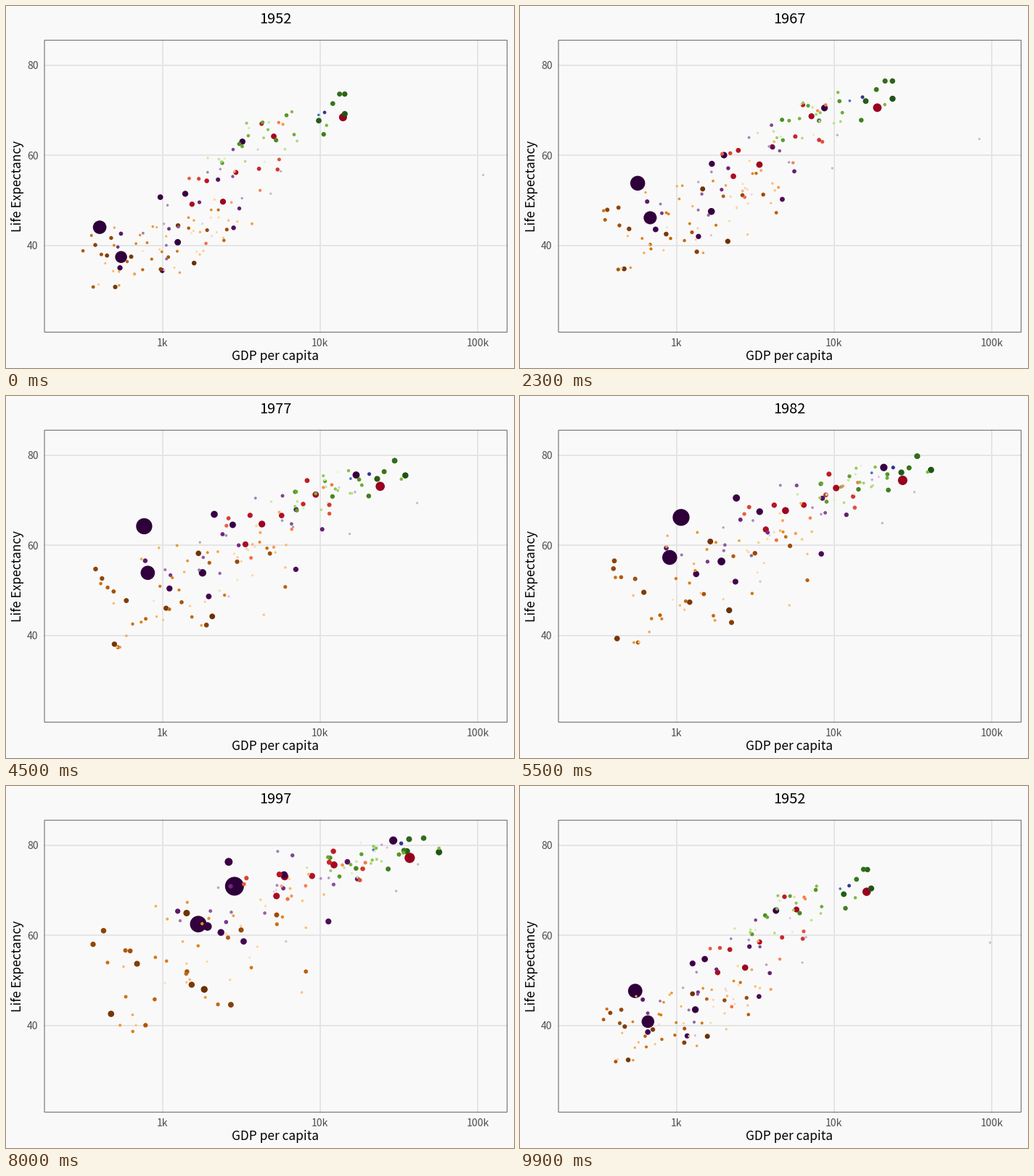
Animation of 700x500 px, one loop 10 s. Source, as a matplotlib script:

```python
import numpy as np
import matplotlib.pyplot as plt
from matplotlib.animation import FuncAnimation
from matplotlib.colors import LinearSegmentedColormap
from matplotlib.patches import Rectangle

W, H, DPI = 700, 500, 100
PX = 72 / DPI                            # one pixel in points
YEARS = np.arange(1952, 2008, 5)
N = len(YEARS)
T = np.linspace(0, 1, N)                 # progress through the years
STEPS = [8] + [9] * 4 + [8] * 7          # frames per transition
STARTS = np.cumsum([0] + STEPS)

# Per continent: palette, countries, population range in millions and its
# growth, start and end of (log income, spread, life span, spread), pull of
# size on income, link of income to life span, and easing power.
CONTINENTS = {
    "asia": dict(
        palette="#2E0039 #40004B #762A83 #9970AB #C2A5CF #E7D4E8",
        count=29, pops=(130, .5), growth=2.4,
        start=(3.2, .29, 47, 7.5), end=(3.78, .44, 71, 5.5),
        pull=-.45, link=.7, power=1.35),
    "africa": dict(
        palette="#6A3006 #B35806 #E08214 #FDB863 #FEE0B6",
        count=51, pops=(60, .4), growth=3.5,
        start=(2.96, .26, 39.3, 4.5), end=(3.2, .38, 54.5, 7.5),
        pull=0, link=.5, power=1.9),
    "europe": dict(
        palette="#1F5514 #4D9221 #7FBC41 #B8E186 #E6F5D0",
        count=30, pops=(78, .8), growth=1.35,
        start=(3.72, .23, 65, 4.5), end=(4.37, .22, 77.7, 2.3),
        pull=.4, link=.75, power=1.5),
    "americas": dict(
        palette="#98001F #C01A26 #F46D43 #FDAE61 #FEE090",
        count=24, pops=(100, 1.2), growth=2.1,
        start=(3.46, .19, 53, 7.5), end=(3.92, .21, 73.3, 3.2),
        pull=.2, link=.6, power=1.4),
    "oceania": dict(
        palette="#313695 #4575B4",
        count=2, pops=(14, 3), growth=2,
        start=(4.01, .01, 69.2, .2), end=(4.47, .05, 80.7, .4),
        pull=.9, link=.9, power=1.2),
}

# Outstanding paths: population, then (year, income, life span) points
PATHS = {
    "asia": [
        (845, [(1952, 400, 44), (1962, 488, 44.5), (1967, 613, 58.4),
               (1977, 741, 64), (1992, 1656, 68.7), (2007, 4959, 73)]),
        (634, [(1952, 547, 37.4), (1967, 701, 47.2), (1982, 856, 56.6),
               (1992, 1164, 60.2), (2007, 2452, 64.7)]),
        (114, [(1952, 3217, 63), (1967, 9848, 71.4), (1977, 16610, 75.4),
               (1992, 26825, 79.4), (2007, 31656, 82.6)]),
        (1.1, [(1952, 108382, 55.6), (1967, 80895, 64.6),
               (1982, 31354, 71.3), (2007, 47307, 77.6)]),
    ],
    "africa": [
        (5, [(1952, 493, 40), (1987, 848, 44), (1992, 737, 23.6),
             (1997, 590, 36.1), (2007, 863, 46.2)]),
    ],
    "americas": [
        (220, [(1952, 13990, 68.4), (1967, 19530, 70.8),
               (1992, 32004, 76.1), (2007, 42952, 78.2)]),
    ],
}


def mix(a, b, t):
    return a + (b - a) * t


def follow(points):
    years, income, life = zip(*points)
    return np.interp(YEARS, years, np.log10(income)), np.interp(YEARS, years, life)


def scores(count, rng):
    return rng.permutation(np.linspace(-1.7, 1.7, count))


def blend(a, b, share):
    """Mix two independent scores, keeping their spread."""
    return share * a + np.sqrt(1 - share ** 2) * b


def simulate(spec, rng):
    count = spec["count"]
    size = np.linspace(1.7, -1.7, count)
    wealth = blend(size, scores(count, rng), spec["pull"])
    health = blend(wealth, scores(count, rng), spec["link"])
    drift_w, drift_h = scores(count, rng), scores(count, rng)
    ease = 1 - (1 - T) ** spec["power"]
    income, gap, life, span = (mix(a, b, ease)
                               for a, b in zip(spec["start"], spec["end"]))
    turn = .55 * T                       # ranks change slowly over the years
    for i, pop in enumerate(np.geomspace(*spec["pops"], count)):
        w = wealth[i] * np.cos(turn) + drift_w[i] * np.sin(turn)
        h = health[i] * np.cos(turn) + drift_h[i] * np.sin(turn)
        w, h = (np.clip(z + rng.normal(0, .07, N), -1.9, 1.9) for z in (w, h))
        yield pop, income + gap * w, life + span * h


def build():
    rng = np.random.default_rng(7)
    dots = []
    for name, spec in CONTINENTS.items():
        ramp = LinearSegmentedColormap.from_list(name, spec["palette"].split())
        group = [(pop, *follow(points)) for pop, points in PATHS.get(name, [])]
        group += simulate(spec, rng)
        group.sort(key=lambda c: -c[0])
        for shade, (pop, income, life) in zip(np.linspace(0, 1, len(group)), group):
            dots.append((pop * spec["growth"] ** (T - .45), income, life, ramp(shade)))
    dots.sort(key=lambda d: -d[0][0])
    pop, income, life, colour = zip(*dots)
    return *(np.array(v).T for v in (pop, income, life)), colour


def to_x(log_income):
    return 215.5 + 217.2 * (log_income - 3)


def to_y(life):
    return 330.5 - 6.225 * (life - 40)


pop, income, life, colours = build()
X, Y = to_x(income), to_y(life)
R = 1.3 + 12.2 * np.sqrt(pop / 1318)

plt.rcParams["font.family"] = "Noto Sans CJK JP"
fig = plt.figure(figsize=(W / DPI, H / DPI), dpi=DPI, facecolor="#F9F9F9")
ax = fig.add_axes([0, 0, 1, 1])
ax.set(xlim=(0, W), ylim=(H, 0))
ax.axis("off")


def label(x, y, text, size, color="black", ha="center", **kw):
    return ax.text(x, y, text, fontsize=size * PX, color=color, ha=ha, **kw)


LEFT, TOP, RIGHT, BOTTOM = 53, 47.3, 690.5, 450.5
GRID = dict(color="#E5E5E5", lw=2 * PX, zorder=1)
for power, text in ((3, "1k"), (4, "10k"), (5, "100k")):
    x = to_x(power)
    ax.plot([x, x], [TOP, BOTTOM], **GRID)
    label(x, 470, text, 14, "#4D4D4D")
for span in (40, 60, 80):
    y = to_y(span)
    ax.plot([LEFT, RIGHT], [y, y], **GRID)
    label(44.5, y + 5.5, str(span), 14, "#4D4D4D", ha="right")
ax.add_patch(Rectangle((LEFT, TOP), RIGHT - LEFT, BOTTOM - TOP, fill=False,
                       ec="#7A7A7A", lw=1.2 * PX, zorder=4, snap=False))

label(371, 489, "GDP per capita", 17.3)
label(21, 249, "Life Expectancy", 17.3, rotation=90, va="baseline",
      rotation_mode="anchor")
title = label(371.5, 24.3, "", 20)
cloud = ax.scatter(X[0], Y[0], c=colours, linewidths=0, zorder=3)


def draw(frame):
    k = np.searchsorted(STARTS, frame, "right") - 1
    t = (frame - STARTS[k]) / STEPS[k]
    after = (k + 1) % N
    x, y, r = (mix(v[k], v[after], t) for v in (X, Y, R))
    cloud.set_offsets(np.column_stack([x, y]))
    cloud.set_sizes((2 * r * PX) ** 2)
    title.set_text(str(YEARS[k if t <= .5 else after]))
    return cloud, title


anim = FuncAnimation(fig, draw, frames=100, interval=100, repeat=True,
                     repeat_delay=0, blit=False)
plt.show()
```
